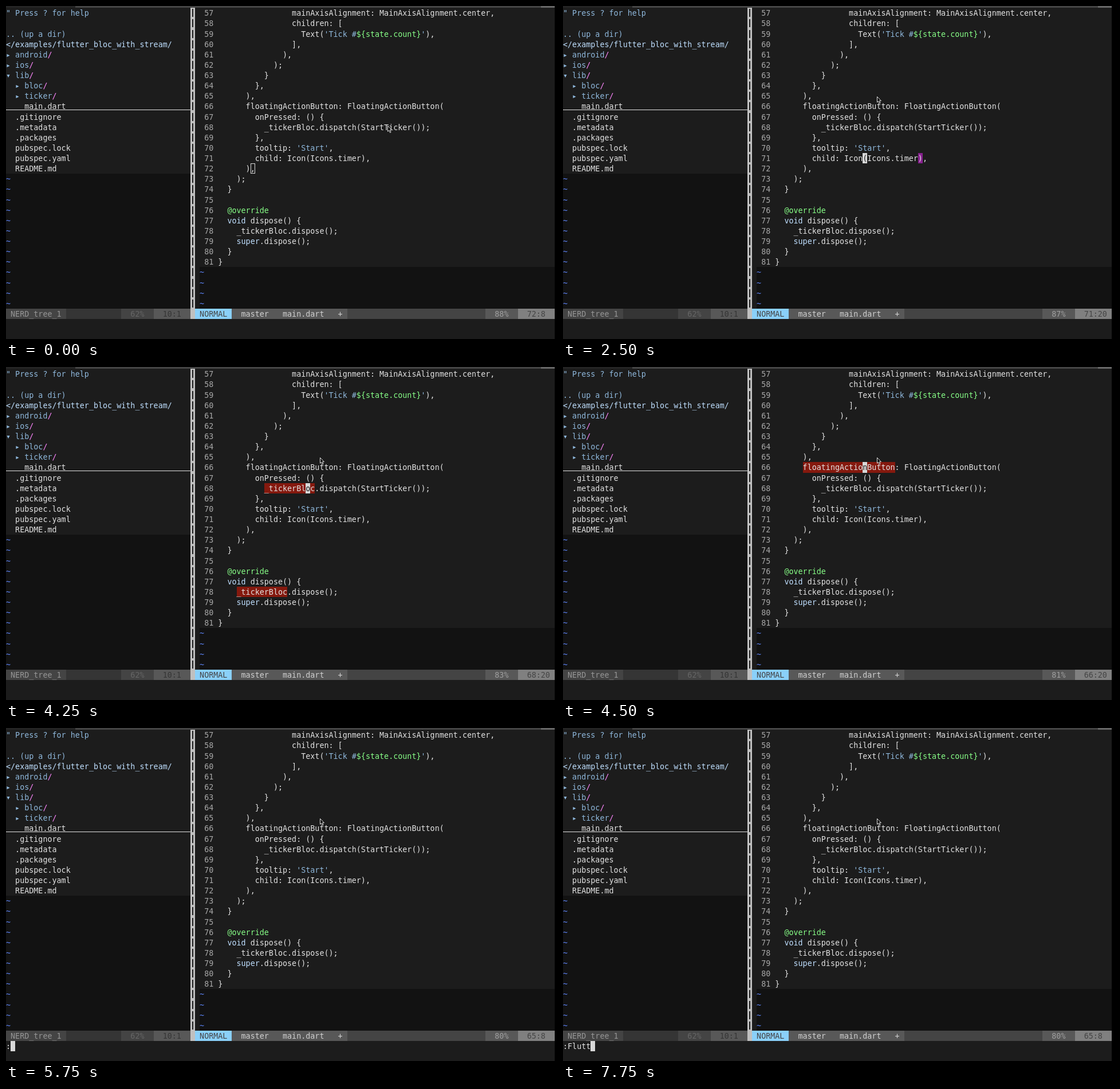
These frames come from a looping animation (962 by 582 pixels, 8000 ms). An HTML page with a canvas:

```html
<!DOCTYPE html>
<html lang="en">
<head>
<meta charset="utf-8">
<title>Editor session</title>
<style>
  html, body { margin: 0; width: 100%; height: 100%; overflow: hidden; background: #1c1c1c; }
  canvas { display: block; }
</style>
</head>
<body>
<canvas id="stage" width="962" height="582"></canvas>
<script>
const ctx = document.getElementById('stage').getContext('2d');
const LOOP = 8000;
const CW = 8.05, RH = 18.125, TOP = 3.25;
const FONT = '13.37px "DejaVu Sans Mono", "Liberation Mono", monospace';
const CODE_COL = 46, CODE_ROWS = 25, FIRST_LINE = 57;
const C = {
  bg: '#1c1c1c', dark: '#121212', text: '#e2e2e2', num: '#a8a8a8', tilde: '#5f87ff',
  str: '#8fb8dc', key: '#bfdfff', green: '#87ff87', slash: '#ff87ff',
  split: '#c0c0c0', cursor: '#d8d8d8', word: '#85190e', paren: '#87208f'
};

const code = [
  '                mainAxisAlignment: MainAxisAlignment.center,',
  '                children: [',
  "                  Text('Tick #${state.count}'),",
  '                ],',
  '              ),',
  '            );',
  '          }',
  '        },',
  '      ),',
  '      floatingActionButton: FloatingActionButton(',
  '        onPressed: () {',
  '          _tickerBloc.dispatch(StartTicker());',
  '        },',
  "        tooltip: 'Start',",
  '        child: Icon(Icons.timer),',
  '      ),',
  '    );',
  '  }',
  '',
  '  @override',
  '  void dispose() {',
  '    _tickerBloc.dispose();',
  '    super.dispose();',
  '  }',
  '}'
];

const tree = [
  ['" Press ? for help', C.str], [''], ['.. (up a dir)', C.str],
  ['</examples/flutter_bloc_with_stream/', C.key],
  ['▸ android/', C.str], ['▸ ios/', C.str], ['▾ lib/', C.str],
  ['  ▸ bloc/', C.str], ['  ▸ ticker/', C.str],
  ['    main.dart', C.text], ['  .gitignore', C.text], ['  .metadata', C.text],
  ['  .packages', C.text], ['  pubspec.lock', C.text], ['  pubspec.yaml', C.text],
  ['  README.md', C.text]
];

// Cursor: start time, line, column, words or bracket to mark
const moves = [
  { t: 0, line: 72, col: 8, hollow: true },
  { t: 1250, line: 72, col: 8 },
  { t: 2500, line: 71, col: 20, bracket: ')' },
  { t: 2750, line: 70, col: 20 },
  { t: 4000, line: 69, col: 10 },
  { t: 4250, line: 68, col: 20, word: '_tickerBloc' },
  { t: 4500, line: 66, col: 20, word: 'floatingActionButton' },
  { t: 5000, line: 65, col: 8 }
];
const mouse = [
  { t: 0, x: 666, y: 209 }, { t: 500, x: 552, y: 172 },
  { t: 750, x: 553, y: 172 }, { t: 1000, x: 548, y: 158 }
];
const typing = [
  { t: 0, text: '' }, { t: 5750, text: ':' }, { t: 6750, text: ':F' },
  { t: 7000, text: ':Fl' }, { t: 7250, text: ':Flu' },
  { t: 7500, text: ':Flut' }, { t: 7750, text: ':Flutt' }
];

const px = col => Math.round(col * CW);
const py = row => Math.round(TOP + row * RH);
const latest = (list, t) => list.filter(s => s.t <= t).pop();

function cells(col, row, cols, rows, color) {
  ctx.fillStyle = color;
  ctx.fillRect(px(col), py(row), px(col + cols) - px(col), py(row + rows) - py(row));
}

function put(col, row, text, color) {
  ctx.fillStyle = color;
  [...text].forEach((ch, i) => {
    if (ch !== ' ') ctx.fillText(ch, (col + i) * CW, py(row) + 14);
  });
}

function mark(row, col, text, bg, fg) {
  cells(CODE_COL + col, row, text.length, 1, bg);
  put(CODE_COL + col, row, text, fg);
}

function tokenColor(tok) {
  if (tok[0] === '$' || tok[0] === '@') return C.green;
  if (tok[0] === "'") return C.str;
  return /^(void|super)$/.test(tok) ? C.key : C.text;
}

function drawTree() {
  cells(0, 16, 40, 13, C.dark);
  tree.forEach(([text, color], row) => {
    put(0, row, text, color);
    if (row > 3 && text.endsWith('/')) {
      cells(text.length - 1, row, 1, 1, C.bg);
      put(text.length - 1, row, '/', C.slash);
    }
  });
  ctx.fillStyle = C.text;
  ctx.fillRect(0, 181, px(40), 1);
  for (let row = 16; row < 29; row++) put(0, row, '~', C.tilde);
  cells(40, 0, 1, 30, C.split);
  ctx.fillStyle = C.bg;
  for (let row = 0; row < 29; row++) ctx.fillRect(325, py(row) + 2, 2, 14);
}

function drawCode() {
  code.forEach((line, row) => {
    put(43, row, String(FIRST_LINE + row), C.num);
    let col = CODE_COL;
    for (const tok of line.split(/(\$\{[^}]*\}|@\w+|'[^'$),]*'?|\b(?:void|super)\b)/)) {
      put(col, row, tok, tokenColor(tok));
      col += tok.length;
    }
  });
  cells(42, CODE_ROWS, 77, 4, C.dark);
  for (let row = CODE_ROWS; row < 29; row++) put(42, row, '~', C.tilde);
}

function drawBars(cur) {
  const segment = (col, cols, bg, text, fg, at) => {
    cells(col, 29, cols, 1, bg);
    put(at, 29, text, fg);
  };
  segment(0, 13, '#444444', 'NERD_tree_1', '#969696', 1);
  segment(13, 12, '#353535', '', '', 0);
  segment(25, 7, '#444444', '62%', '#666666', 27);
  segment(32, 8, '#585858', '10:1', '#353535', 34);
  segment(41, 8, '#8ad0fa', 'NORMAL', '#444444', 42);
  segment(49, 25, '#585858', 'master   main.dart   +', '#d0d0d0', 51);
  segment(74, 30, '#444444', '', '', 0);
  segment(104, 7, '#585858', Math.floor(cur.line / 81 * 100) + '%', '#a0a0a0', 106);
  segment(111, 8, '#808080', cur.line + ':' + cur.col, '#444444', 113);

  // Lower edge of the tab line
  [[0, 15, '#242424'], [15, 101, '#444444'], [116, 3, '#666666']].forEach(([col, cols, color]) => {
    ctx.fillStyle = color;
    ctx.fillRect(px(col), 0, px(col + cols) - px(col), 3);
  });
  ctx.fillStyle = '#000';
  ctx.fillRect(px(119), 0, 4, 582);
}

function drawCursor(cur, command) {
  const row = cur.line - FIRST_LINE, col = cur.col - 1, line = code[row];
  if (cur.word) {
    code.forEach((text, r) => {
      const at = text.indexOf(cur.word);
      if (at >= 0) mark(r, at, cur.word, C.word, C.text);
    });
  }
  if (cur.bracket) mark(row, line.indexOf(cur.bracket, col), cur.bracket, C.paren, C.text);
  if (command) {
    put(0, 30, command, C.text);
    cells(command.length, 30, 1, 1, C.cursor);
  } else if (cur.hollow) {
    ctx.strokeStyle = C.cursor;
    ctx.lineWidth = 1;
    ctx.strokeRect(px(CODE_COL + col) + 0.5, py(row) + 0.5, 7, 17);
  } else {
    mark(row, col, line[col], C.cursor, C.bg);
  }
}

function drawMouse({ x, y }) {
  const arrow = new Path2D('M.5 .5V10.3L2.7 8.3L4.4 12.3L6 11.6L4.4 7.7H7.4Z');
  ctx.save();
  ctx.translate(x, y);
  ctx.fillStyle = '#000';
  ctx.strokeStyle = '#e8e8e8';
  ctx.lineWidth = 1;
  ctx.fill(arrow);
  ctx.stroke(arrow);
  ctx.restore();
}

let shown = '';
function frame(now) {
  const t = now % LOOP;
  const cur = latest(moves, t), pointer = latest(mouse, t), typed = latest(typing, t);
  const state = [cur.t, pointer.t, typed.t].join();
  if (state !== shown) {
    shown = state;
    ctx.font = FONT;
    ctx.fillStyle = C.bg;
    ctx.fillRect(0, 0, 962, 582);
    drawTree();
    drawCode();
    drawBars(cur);
    drawCursor(cur, typed.text);
    drawMouse(pointer);
  }
  requestAnimationFrame(frame);
}

const start = performance.now();
requestAnimationFrame(function tick() {
  frame(0);
});
frame = (draw => () => draw(Math.max(0, performance.now() - start)))(frame);
</script>
</body>
</html>
```
